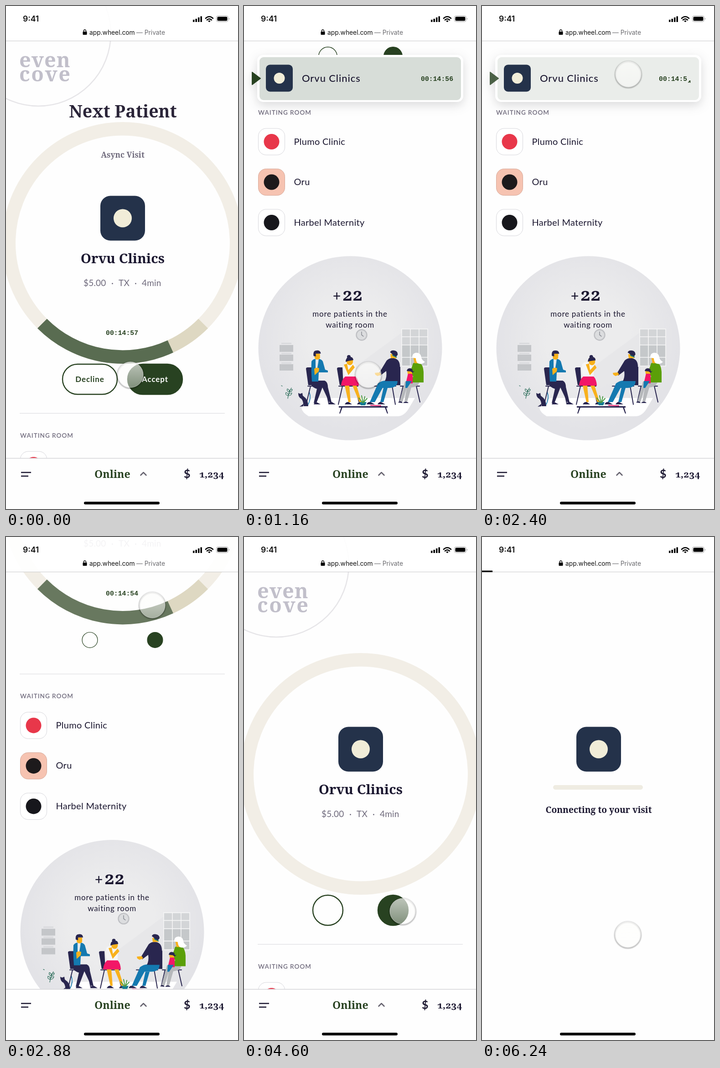
Write an HTML page that moves like this. It is 509 px wide and 1101 px high and loops after 6360 ms.

```html
<!DOCTYPE html>
<html lang="en">
<head>
<meta charset="utf-8">
<title>Next Patient</title>
<style>
html, body { margin: 0; width: 100%; height: 100%; overflow: hidden; background: #fefefe; }
svg { display: block; width: 509px; height: 1101px; }
text { font-family: Lato, sans-serif; fill: #1b1730; }
.serif { font-family: "Noto Serif", serif; font-weight: 700; }
.old { font-variant-numeric: oldstyle-nums; }
.mid { text-anchor: middle; }
.soft { fill: #6f6a7c; }
.brand { font-size: 45px; font-weight: 900; fill: #c1bfca; }
.ui { font: 13.8px Inter, sans-serif; fill: #111; }
.clock text { font: 700 14.8px "Liberation Mono", monospace; fill: #284221; }
.label { font-size: 17px; font-weight: 700; letter-spacing: .9px; }
.row { font-size: 20px; letter-spacing: .3px; }
.more { font-size: 17px; letter-spacing: .75px; }
.price { font-size: 19px; letter-spacing: .2px; }
#card { filter: drop-shadow(0 7px 11px rgba(40, 40, 50, .17)); }
#rim { filter: blur(1.2px); }
.line { fill: none; stroke-linecap: round; stroke-linejoin: round; }
</style>
</head>
<body>
<svg viewBox="0 0 509 1101">
  <defs>
    <linearGradient id="glass" x2="0" y2="1">
      <stop stop-color="#fdfdfb" stop-opacity=".7"/>
      <stop offset="1" stop-color="#fdfdfb" stop-opacity=".42"/>
    </linearGradient>
    <radialGradient id="wall" cx=".5" cy=".45">
      <stop offset=".45" stop-color="#ececed"/>
      <stop offset="1" stop-color="#e3e3e7"/>
    </radialGradient>
    <clipPath id="room"><circle cx="233" cy="749" r="201.5"/></clipPath>
  </defs>
  <rect width="509" height="1101" fill="#fefefe"/>

  <g id="page">
    <g class="leave">
      <circle cx="71" cy="60" r="159" fill="#fefefe" stroke="#e6e5e8" stroke-width="2.5"/>
      <text class="serif brand" x="29" y="134" letter-spacing="1">even</text>
      <text class="serif brand" x="29" y="165" letter-spacing="2.6">cove</text>
    </g>
    <text class="serif mid fade" x="256.500" y="244" font-size="37.5" style="fill:#2a2438">Next Patient</text>
    <g id="ring" fill="none" stroke-width="29.5">
      <circle cx="256" cy="518.5" r="249.75" stroke="#f2eee6"/>
      <g class="fade">
        <path id="tan" stroke="#ded8c2"/>
        <path id="green" stroke="#284221"/>
      </g>
    </g>
    <text class="serif mid soft fade" x="256" y="332" font-size="17.2">Async Visit</text>
    <g id="tile">
      <rect x="207" y="415.500" width="98" height="98" rx="22" fill="#24324a"/>
      <circle cx="256" cy="464.500" r="20" fill="#f1edd8"/>
    </g>
    <g class="leave">
      <text class="serif mid" x="256" y="563" font-size="29.5">Orvu Clinics</text>
      <g class="price">
        <text class="soft" x="170" y="613">$5.00</text>
        <text class="soft" x="231" y="613">·</text>
        <text class="soft" x="247" y="613">TX</text>
        <text class="soft" x="282" y="613">·</text>
        <text class="soft" x="298" y="613">4min</text>
      </g>
      <path d="M30 891.500H480" stroke="#d9d9dc"/>
      <text class="soft" x="31" y="945" font-size="13.5" font-weight="600" letter-spacing="1">WAITING ROOM</text>
      <g id="rows"></g>
    </g>
    <g class="fade clock" data-x="219" data-y="720"></g>
    <g class="btn" transform="translate(184 817)">
      <rect height="66" y="-33" rx="33" fill="#fefefe" stroke="#284221" stroke-width="2.4"/>
      <text class="label mid" y="6" style="fill:#284221">Decline</text>
    </g>
    <g class="btn" transform="translate(327 817)">
      <rect height="66" y="-33" rx="33" fill="#284221" stroke="#284221" stroke-width="2.4"/>
      <text class="label mid" y="6" style="fill:#fff">Accept</text>
    </g>

    <g class="leave" transform="translate(0 707)">
      <circle cx="233" cy="749" r="201.5" fill="url(#wall)"/>
      <g clip-path="url(#room)">
        <path d="M346 715L230 800V858H375V788Z" fill="#e5e5e8" opacity=".7"/>
        <path d="M346 707h57v81h-57z" fill="#d3d5d7"/>
        <path d="M346 742h57v46h-57z" fill="#c5c8ca"/>
        <path d="M346 707h57v81h-57zM365 707v81M384 707v81M346 724h57M346 742h57M346 769h57" fill="none" stroke="#f7f7f7" stroke-width="1.6"/>
        <path d="M78 742h30v15H78zM78 763h30v14H78zM78 784h30v14H78z" fill="#c4c6c9"/>
        <path d="M82 737h22v3H82zM82 759h22v3H82zM82 780h22v3H82z" fill="#d9dadd"/>
        <path d="M150 858H375L362 880Q352 898 336 898H142Q128 890 126 880Z" fill="#fff"/>
      </g>
      <g class="line" stroke="#2d6e5b" stroke-width="1.2">
        <path d="M96 859Q98 846 104 836M97 853q-7-1-5-7q6 1 5 7q7 0 8-6q-7 0-8 6M99 845q-6-2-4-7q6 2 4 7q7-1 7-6q-6 0-7 6M82 831l2 1"/>
      </g>
      <path d="M119 847l4 2 5-2 1 6 6 5q6 7 6 18h-11q1-10-4-16-7-3-7-13zM130 871l-8 6 9-1z" fill="#29264f"/>
      <path class="line" d="M143 844q5 14-2 28" stroke="#1479b0" stroke-width="1.6"/>

      <g class="line" stroke="#29264f" stroke-width="2">
        <path d="M140 832H183M146 832L136 873M178 832L186 870M208 832H250M216 832L207 872M244 832L252 866M286 832H333M293 832L284 862M325 832L332 872M343 832H385M349 832L341 866M378 832L386 867"/>
      </g>
      <path d="M136 794q0-3 4-3h9v39h-8zM204 794q0-3 4-3h8l2 39h-8zM343 790v40h-11l1-36q0-4 4-4z" fill="#29264f"/>

      <path d="M151 820H177Q184 823 184 834L192 867H187L172 835 159 869H153L160 838Q146 834 146 822Z" fill="#29264f"/>
      <path d="M153 872q2-6 8-4l7 4zM185 872q2-6 8-5l8 5z" fill="#29264f"/>
      <path d="M148 778q3-6 12-6 10 0 13 6l5 18 6 2v4h-20l-1 20h-14q-2-24-1-44z" fill="#1479b0"/>
      <path d="M157 772h7l-1 8-3 18-3-2z" fill="#dfe8ee"/>
      <path d="M154 794q5-4 11-1l-1 7-9 8z" fill="#f8b11c"/>
      <g id="man">
        <path d="M155 761h12v8q0 5-7 5-5-1-5-6z" fill="#f8b11c"/>
        <path d="M153 766q-2-12 7-12 8-1 9 7h-11v6z" fill="#29264f"/>
      </g>

      <path d="M222 811h23q6 6 7 20h-39q1-13 9-20z" fill="#f21767"/>
      <path d="M221 831h10l3 36h-5zM238 831h9l11 36h-5z" fill="#f8b11c"/>
      <path d="M221 872q3-6 9-5l7 5zM248 872q3-6 8-5l7 5z" fill="#29264f"/>
      <path d="M220 784q6-7 16-4l9 6v25h-23q-5-12-2-27z" fill="#f5f5f5"/>
      <g id="woman">
        <path d="M219 785l10 23 14-17-4-6-10 12-3-14zM225 771h14v9q-2 7-8 6-5-1-6-7z" fill="#f8b11c"/>
        <path d="M223 779q0-10 8-11 8-1 9 7l-11 2zM226 768a4 4 0 1 1 8 0a4 4 0 0 1-8 0z" fill="#29264f"/>
      </g>

      <path d="M310 820H337Q337 836 318 836H304L287 867H276L294 826Q302 820 310 820Z" fill="#1479b0"/>
      <path d="M306 836h9l-9 31h-7z" fill="#1479b0"/>
      <path d="M269 872q2-6 9-5l9 5zM293 872q3-6 8-5l9 5z" fill="#29264f"/>
      <path d="M313 776q6-6 16-5 12 2 13 16 2 18-4 34h-29q5-9 3-22l-13 10-3-5z" fill="#29264f"/>
      <path d="M298 802l3 5-8 3-5-3-1-4z" fill="#f8b11c"/>
      <g id="guest">
        <path d="M321 762h13v9h-12z" fill="#f8b11c"/>
        <path d="M320 758q2-5 9-4 8 1 8 9l-3 4h-6l-3-5z" fill="#29264f"/>
        <path d="M325 764l10 5" stroke="#167a78" stroke-width="2"/>
      </g>

      <path d="M353 822h32q-2 12-18 13l-9 31h-6l5-30-9 30h-7z" fill="#b6b8bb"/>
      <path d="M338 868q3-4 8-2l2 3zM349 869q4-5 10-2l2 2z" fill="#29264f"/>
      <path d="M371 782q7-4 15-1 7 5 8 20v23h-27l4-14-8-4z" fill="#5b9f08"/>
      <path d="M371 766h12v16h-9z" fill="#f8b11c"/>
      <path d="M369 770q0-11 10-11 9 1 10 10 1 6 8 10-7 7-16 3-4-4-4-11z" fill="#fff"/>
      <path d="M360 804q7-3 10 4v18h-15z" fill="#f21767"/>
      <path d="M355 821h13l-10 15h-4z" fill="#1479b0"/>
      <path d="M358 796h11v9h-10z" fill="#f8b11c"/>
      <path d="M357 799q1-7 8-6 6 1 5 7l4-1-4 4-4-3z" fill="#29264f"/>

      <path d="M208 876H315V879H312L316 892H314L309 879H216L211 892H209L213 879H208Z" fill="#29264f"/>
      <path d="M253 867h16l-3 7h-10z" fill="#147c91"/>
      <path class="line" d="M260 868l-8-10M261 868l-3-15M262 868l3-13M262 868l8-9" stroke="#4b9a46" stroke-width="2"/>
      <path d="M277 874l24 1" stroke="#f21767" stroke-width="2"/>

      <circle cx="258" cy="720" r="11.5" fill="#dcdddf" stroke="#bfc0c4" stroke-width="2.4"/>
      <path class="line" d="M258 713v7l4 3" stroke="#777982" stroke-width="1.2"/>
      <text class="old" x="195" y="644" font-size="32">+</text>
      <text class="serif old" x="216" y="645" font-size="38">22</text>
      <text class="more mid" x="232.500" y="680">more patients in the</text>
      <text class="more mid" x="232.500" y="704">waiting room</text>
    </g>
  </g>

  <g id="connect">
    <rect x="156" y="543" width="197" height="10" rx="5" fill="#efece2"/>
    <text class="serif mid" x="256" y="604" font-size="19.3">Connecting to your visit</text>
  </g>

  <g id="card">
    <rect x="29" y="107" width="452" height="103" rx="13" fill="#fff"/>
    <rect id="shade" x="34" y="112" width="442" height="94" rx="9" fill="#284a2c"/>
    <path id="flag" d="M18 145L36 158.500 18 172Z" fill="#284221" stroke="#284221" stroke-width="2" stroke-linejoin="round"/>
    <rect x="48" y="128.500" width="59" height="59" rx="9" fill="#24324a"/>
    <circle cx="77.500" cy="158" r="12" fill="#f1edd8"/>
    <text x="127" y="166" font-size="22" font-weight="500" letter-spacing=".9">Orvu Clinics</text>
    <g class="clock" data-x="388" data-y="164"></g>
  </g>

  <g>
    <rect width="509" height="76" fill="#fff" opacity=".92"/>
    <path d="M0 76.500H509" stroke="#c8c8ca"/>
    <rect id="load" y="73.500" height="3.500"/>
    <text class="ui" x="37" y="34" style="font-size:17.500px;font-weight:600">9:41</text>
    <path d="M410 30h3.500v5h-3.500zM415.500 28h3.500v7h-3.500zM421 25h3.500v10h-3.500zM426.500 22.500h3.500v12.500h-3.500z"/>
    <path class="line" d="M438 27q8-7.500 16 0M441 30.500q5-4.500 10 0" stroke="#000" stroke-width="2.6"/>
    <path d="M443.200 32.700q2.800-2.200 5.600 0l-2.800 2.800z"/>
    <rect x="461.500" y="21.500" width="26" height="13" rx="4" fill="none" stroke="#a5a5a5"/>
    <rect x="463.500" y="23.500" width="22" height="9" rx="2.300"/>
    <path d="M489 26q3 2 0 4z" fill="#a5a5a5"/>
    <rect x="168.500" y="56" width="9" height="7" rx="1.200"/>
    <path d="M170.500 57v-2.500a2.500 2.500 0 0 1 5 0V57" fill="none" stroke="#000" stroke-width="1.400"/>
    <text class="ui" x="183" y="62.500">app.wheel.com</text>
    <text class="ui" x="286" y="62.500" style="fill:#6c6c70">— Private</text>
  </g>

  <g id="bar">
    <rect y="990" width="509" height="111" fill="#fefefe"/>
    <path d="M0 990H509" stroke="#d4d4d8" stroke-width="1.500"/>
    <path d="M33 1021H55M33 1029H49" stroke="#1b1730" stroke-width="2.500"/>
    <text class="serif" x="194" y="1033" font-size="23.2" style="fill:#284221">Online</text>
    <path class="line" d="M295.500 1027l6-6 6 6" stroke="#66636f" stroke-width="2.500"/>
    <text x="390" y="1033" font-size="25" font-weight="700">$</text>
    <text class="serif old" x="424" y="1032" font-size="20.7">1,234</text>
  </g>
  <rect x="171" y="1085" width="166" height="6" rx="3"/>

  <g id="cursor">
    <circle id="rim" cy="1.200" r="28.500" fill="none" stroke="#000" stroke-opacity=".32" stroke-width="2.400"/>
    <circle r="28" fill="url(#glass)" stroke="#fff" stroke-opacity=".6"/>
  </g>
</svg>

<script>
const LOOP = 6360;
const $ = s => document.querySelector(s);
const $$ = s => [...document.querySelectorAll(s)];
const put = (el, name, value) => el.setAttribute(name, value);
const ease = p => p < .5 ? 4 * p ** 3 : 1 - 4 * (1 - p) ** 3;

// Eased value from time/value pairs
function key(t, ...k) {
  for (let i = 2; i < k.length; i += 2) {
    if (t < k[i]) {
      const p = Math.max(0, (t - k[i - 2]) / (k[i] - k[i - 2]));
      return k[i - 1] + (k[i + 1] - k[i - 1]) * ease(p);
    }
  }
  return k[k.length - 1];
}

function arc(from, to) {
  const at = d => {
    const a = d * Math.PI / 180;
    return `${256 + 249.75 * Math.cos(a)} ${518.5 + 249.75 * Math.sin(a)}`;
  };
  return `M${at(from)}A249.75 249.75 0 0 1 ${at(to)}`;
}
put($('#green'), 'd', arc(65.2, 135));
put($('#tan'), 'd', arc(45, 65.2));

const rows = [
  ['Plumo Clinic', '#fff', '#d6d6db', '#e8374a'],
  ['Oru', '#f6c3b1', '#d7a898', '#1d1a1c'],
  ['Harbel Maternity', '#fff', '#d6d6db', '#17171c']
];
$('#rows').innerHTML = rows.map(([name, bg, edge, dot], i) => `
  <g transform="translate(0 ${1004 + i * 88.5})">
    <rect x="31.5" y="-29" width="58" height="58" rx="17" fill="${bg}" stroke="${edge}"/>
    <circle cx="60.5" r="17" fill="${dot}"/>
    <text class="row" x="109.5" y="6.5">${name}</text>
  </g>`).join('');

const digits = $$('.clock').map((g, i) => {
  const { x, y } = g.dataset, end = +x + 7 * 8.88;
  g.innerHTML = `<clipPath id="slot${i}"><rect x="${end - 1}" y="${y - 12}" width="12" height="16"/></clipPath>
    <text x="${x}" y="${y}">00:14:5</text>
    <g clip-path="url(#slot${i})"><text x="${end}" y="${y}"></text></g>`;
  return g.lastElementChild.firstElementChild;
});

const page = $('#page'), ring = $('#ring'), tile = $('#tile'), card = $('#card');
const bar = $('#bar'), cursor = $('#cursor'), green = $('#green'), shade = $('#shade');
const flag = $('#flag'), load = $('#load'), connect = $('#connect');
const woman = $('#woman'), man = $('#man'), guest = $('#guest');
const fading = $$('.fade'), leaving = $$('.leave');
const buttons = $$('.btn').map((el, i) => ({
  el, x: [184, 327][i], box: el.children[0], label: el.children[1]
}));

function drawClock(t) {
  const s = t + 745, n = Math.floor(s / 1000), p = (s % 1000) / 200;
  const rolling = n > 0 && p < 1;
  const shown = rolling && p < .5 ? n - 1 : n;
  const dy = !rolling ? 0 : p < .5 ? -14 * ease(p * 2) : 14 * (1 - ease(p * 2 - 1));
  for (const d of digits) {
    d.textContent = Math.max(3, 7 - shown);
    put(d, 'transform', `translate(0 ${dy})`);
  }
}

function drawButtons(t) {
  const w = key(t, 0, 120, 880, 120, 1040, 66, 2960, 66, 3180, 120, 4260, 120, 4500, 66);
  const size = key(t, 1060, 1, 1280, 0, 2760, 0, 3000, 1, 4660, 1, 4920, 0);
  for (const b of buttons) {
    put(b.el, 'transform', `translate(${b.x} 817) scale(${size})`);
    put(b.box, 'x', -w / 2);
    put(b.box, 'width', w);
    put(b.label, 'opacity', Math.max(0, (w - 92) / 28));
  }
}

function drawCursor(t) {
  const p = key(t, 2940, 0, 3840, 1);
  const x = key(t, 1260, 273, 2100, 321, 2940, 321, 3840, 348, 5300, 348, 6200, 320)
    + 21 * Math.sin(Math.PI * p);
  const y = key(t, 1260, 807, 2100, 149, 2940, 149, 3840, 819, 5300, 819, 6200, 870);
  const press = key(t, 2420, 1, 2500, .88, 2600, 1, 4120, 1, 4200, .88, 4300, 1);
  put(cursor, 'transform', `translate(${x} ${y}) scale(${press})`);
}

function drawPeople(t) {
  const sway = Math.sin((t - 1780) / 1240 * Math.PI);
  const lean = (1 - Math.cos((t - 1160) / 1240 * Math.PI)) / 2;
  put(woman, 'transform', `translate(${lean * 8} 0) rotate(${lean * 3} 231 800)`);
  put(man, 'transform', `rotate(${sway * 2} 160 774)`);
  put(guest, 'transform', `rotate(${-sway * 2} 328 772)`);
}

function render(t) {
  const scroll = key(t, 100, 0, 1007, 707, 2640, 707, 3340, 0);
  const pulse = (1 + Math.cos((t - 1100) / 2000 * Math.PI)) / 2;
  const fade = key(t, 4260, 1, 4540, 0);
  const stay = key(t, 4720, 1, 5020, 0);
  const pinned = key(t, 880, 0, 1080, 1, 2600, 1, 2780, 0);
  const gone = key(t, 4800, 0, 5140, 1);

  put(page, 'transform', `translate(0 ${-scroll})`);
  fading.forEach(el => put(el, 'opacity', fade * (1 - pinned)));
  leaving.forEach(el => put(el, 'opacity', stay));
  put(ring, 'opacity', stay * (1 - pinned));
  put(green, 'opacity', .675 + .195 * pulse);
  put(tile, 'transform', `translate(0 ${key(t, 3340, 0, 3500, 1.5, 3560, 1.5, 3800, 0)})`);

  put(card, 'opacity', pinned);
  put(card, 'transform', `translate(0 ${-12 * (1 - pinned)})`);
  put(shade, 'opacity', .065 + .12 * pulse);
  put(flag, 'opacity', .75 + .25 * pulse);

  put(bar, 'transform', `translate(0 ${111 * gone})`);
  put(bar, 'opacity', 1 - gone);
  put(load, 'width', Math.max(0, (t - 5060) * .0195));
  put(connect, 'opacity', key(t, 5060, 0, 5340, 1));

  drawClock(t);
  drawButtons(t);
  drawPeople(t);
  drawCursor(t);
}

function tick(now) {
  render(now % LOOP);
  requestAnimationFrame(tick);
}
render(0);
requestAnimationFrame(tick);
</script>
</body>
</html>
```
